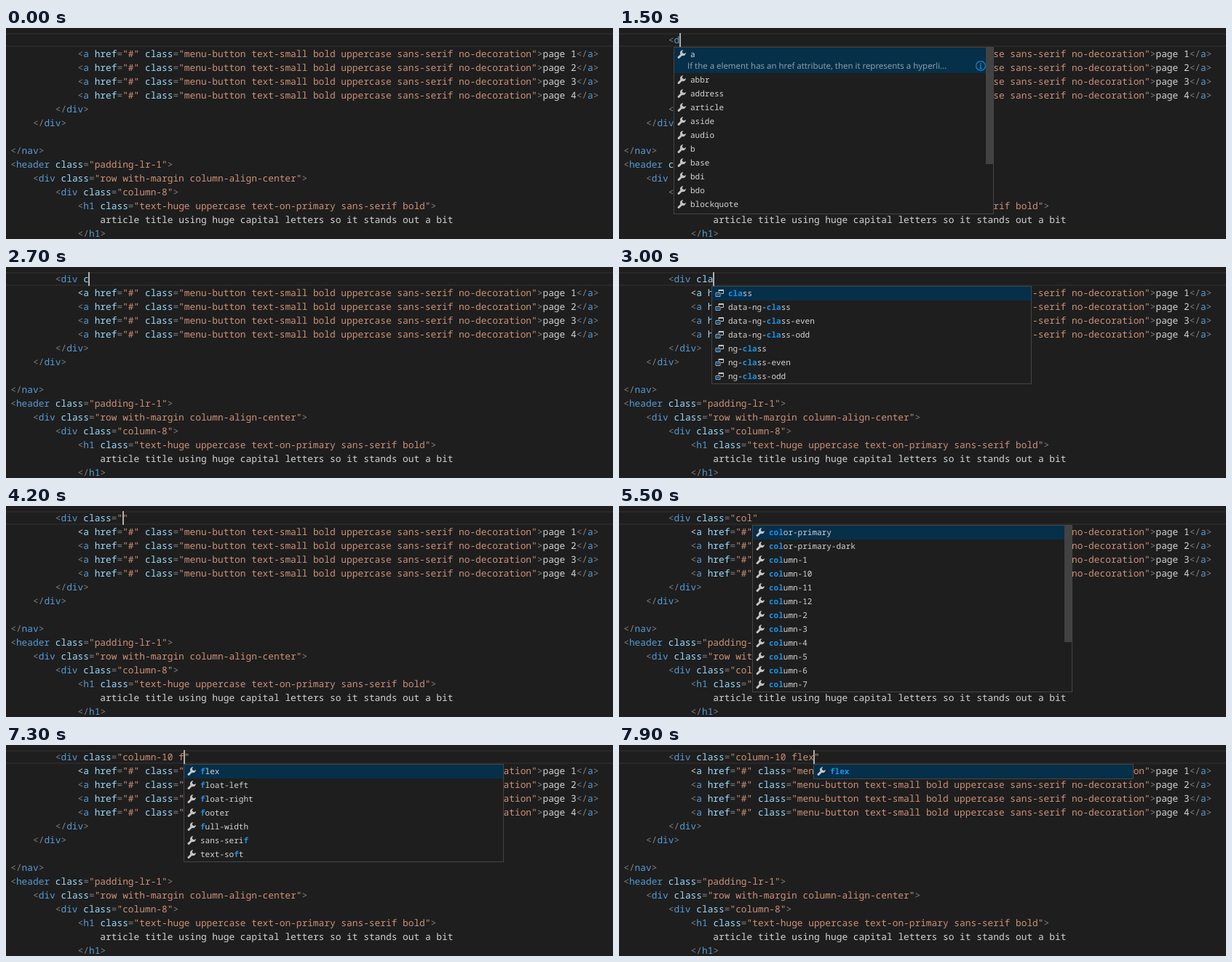
Recreate the animation shown at these times as an HTML page. Size 834 px wide and 290 px high, loop 8 s.

```html
<!DOCTYPE html>
<html lang="en">
<head>
<meta charset="utf-8">
<title>Code completion</title>
<style>
html, body { margin: 0; width: 100%; height: 100%; overflow: hidden; background: #1e1e1e; }
#stage {
  position: relative; width: 834px; height: 290px; overflow: hidden;
  font: 12.83px/19px "Noto Sans Mono", monospace; text-rendering: geometricPrecision;
  font-variant-ligatures: none; color: #d4d4d4;
}
#active { position: absolute; left: -2px; right: -2px; top: 7px; height: 15px; border: 2px solid #282828; }
#code { position: absolute; left: 6.2px; top: 7px; }
#code div { height: 19px; white-space: pre; }
.mark { color: #808080; }
.tag { color: #569cd6; }
.attr { color: #9cdcfe; }
.str { color: #ce9178; }
#caret { position: absolute; top: 7px; width: 2px; height: 19px; background: #aeafad; }
#popup {
  position: absolute; top: 26px; width: 440px; max-height: 230px; box-sizing: border-box;
  border: 1px solid #454545; background: #1e1e1e; overflow: hidden; font-size: 11px;
}
.item { position: relative; height: 19px; padding-left: 22px; white-space: pre; }
.item.selected { background: #062f4a; }
.item.detailed { height: 35px; }
.item b { color: #1a94e6; }
.item svg { position: absolute; left: 3px; top: 2px; width: 14px; height: 14px; }
.doc {
  position: absolute; left: 18px; top: 17px; width: 396px; height: 17px; overflow: hidden;
  font: 11.5px/17px "Open Sans", sans-serif; color: #93a5b1;
}
.item .info { left: 413px; top: 17px; width: 16px; height: 16px; }
.thumb { position: absolute; right: 0; top: 0; width: 10px; height: 160px; background: #424242; }
</style>
</head>
<body>
<svg width="0" height="0" style="position:absolute">
  <symbol id="wrench" viewBox="0 0 14 14">
    <path d="M3 11.5 8 6.5" stroke="#c5c5c5" stroke-width="3" stroke-linecap="round"/>
    <path d="M9.2 1.2A4 4 0 1 0 12.9 5L10.6 6.3 8 6 7.8 3.4Z" fill="#c5c5c5"/>
  </symbol>
  <symbol id="field" viewBox="0 0 14 14">
    <path d="M6 5.5V2.5H12.5V7.5H9" fill="none" stroke="#c5c5c5"/>
    <path d="M6 3H12.5" stroke="#c5c5c5" stroke-width="2"/>
    <path d="M2 6.5H8V11.5H2Z" fill="#1e1e1e" stroke="#75beff"/>
    <path d="M3.5 9H6.5" stroke="#75beff"/>
  </symbol>
  <symbol id="info" viewBox="0 0 16 16">
    <circle cx="8" cy="8" r="6.4" fill="none" stroke="#1a83c8" stroke-width="1.2"/>
    <path d="M8 4V5.6M6.5 7.2H8V11.5M6.3 11.5H9.7" fill="none" stroke="#1a83c8" stroke-width="1.3"/>
  </symbol>
</svg>
<div id="stage">
  <div id="active"></div>
  <div id="code"></div>
  <div id="caret"></div>
  <div id="popup"></div>
</div>
<script>
const LOOP = 8000, CHAR = 7.697, LEFT = 6.2, INDENT = 8;
const $ = id => document.getElementById(id);
const pad = n => ' '.repeat(n);
const escapeHtml = s => s.replace(/&/g, '&amp;').replace(/</g, '&lt;');
const columnX = col => Math.floor(LEFT + (INDENT + col) * CHAR);
const icon = (id, cls = '') => `<svg class="${cls}"><use href="#${id}"/></svg>`;

const link = n => pad(12) +
  `<a href="#" class="menu-button text-small bold uppercase sans-serif no-decoration">page ${n}</a>`;
const page = [
  link(1), link(2), link(3), link(4),
  pad(8) + '</div>', pad(4) + '</div>', '', '</nav>',
  '<header class="padding-lr-1">',
  pad(4) + '<div class="row with-margin column-align-center">',
  pad(8) + '<div class="column-8">',
  pad(12) + '<h1 class="text-huge uppercase text-on-primary sans-serif bold">',
  pad(16) + 'article title using huge capital letters so it stands out a bit',
  pad(12) + '</h1>'
];

// An unclosed tag on the line above turns the next tag's name into an attribute.
function highlight(line, inTag = false) {
  let named = inTag;
  return line.replace(/<\/?|>|"[^"]*"?|=|\s+|[^\s<>="]+/g, token => {
    let kind = '';
    if (token[0] === '<') {
      kind = inTag ? '' : 'mark';
      named = inTag;
      inTag = true;
    } else if (token === '>') {
      kind = 'mark';
      inTag = false;
    } else if (inTag && token.trim()) {
      if (token === '=') kind = 'mark';
      else if (token[0] === '"') kind = 'str';
      else { kind = named ? 'attr' : 'tag'; named = true; }
    }
    return `<span class="${kind}">${escapeHtml(token)}</span>`;
  });
}

const words = s => s.split(' ');
const menu = (list, iconId, doc) => ({ items: words(list), iconId, doc });
const menus = {
  tags: menu('a abbr address article aside audio b base bdi bdo blockquote body', 'wrench',
    'If the a element has an href attribute, then it represents a hyperli...'),
  d: menu('div data datalist dd del details dfn dialog dl dt', 'wrench',
    'The div element has no special meaning at all. It represents its children. I...'),
  attrs: menu('class contenteditable contextmenu accesskey data-ng-change data-ng-checked ' +
    'data-ng-class data-ng-class-even data-ng-class-odd data-ng-click data-ng-cloak data-ng-copy', 'field'),
  cl: menu('class data-ng-class data-ng-class-even data-ng-class-odd data-ng-click data-ng-cloak ' +
    'data-ng-dblclick data-ng-include ng-class ng-class-even ng-class-odd ng-click', 'field'),
  cla: menu('class data-ng-class data-ng-class-even data-ng-class-odd ng-class ng-class-even ng-class-odd', 'field'),
  columns: menu('color-primary color-primary-dark column-1 column-10 column-11 column-12 ' +
    'column-2 column-3 column-4 column-5 column-6 column-7', 'wrench'),
  f: menu('flex float-left float-right footer full-width sans-serif text-soft', 'wrench'),
  flex: menu('flex', 'wrench')
};
menus.di = { ...menus.d, items: words('div dialog audio bdi dir') };
menus.div = { ...menus.d, items: ['div'] };

const popup = (name, col, query, selected = 0) => ({ ...menus[name], col, query, selected });
const ON = true, OFF = false;
const cls = '<div class="', ten = cls + 'column-10';

// [start ms, typed text, caret, popup]
const steps = [
  [0, '', OFF], [300, '', ON], [600, '', OFF], [1000, '', ON],
  [1200, '<', ON], [1300, '<', ON, popup('tags', 1, '')],
  [1500, '<d', ON, popup('tags', 1, '')],
  [1600, '<d', ON, popup('d', 2, 'd')],
  [1700, '<di', ON, popup('di', 3, 'di')],
  [1900, '<div', ON, popup('div', 4, 'div')],
  [2000, '<div ', ON], [2400, '<div ', OFF],
  [2700, '<div c', ON], [2800, '<div c', ON, popup('attrs', 6, 'c')],
  [2900, '<div cl', ON, popup('cl', 7, 'cl')],
  [3000, '<div cla', ON, popup('cla', 7.75, 'cla')],
  [3100, '<div cla', ON, popup('cla', 8, 'cla')],
  [3400, cls, ON], [3800, cls, OFF], [4200, cls, ON], [4500, cls, OFF],
  [4700, cls + 'c', ON], [4800, cls + 'c', ON, popup('columns', 13, 'c')],
  [4900, cls + 'co', ON, popup('columns', 14, 'co')],
  [5000, cls + 'col', ON, popup('columns', 14.75, 'col')],
  [5100, cls + 'col', ON, popup('columns', 15, 'col')],
  [5500, cls + 'col', OFF, popup('columns', 15, 'col')],
  [5600, cls + 'col', OFF, popup('columns', 15, 'col', 1)],
  [5700, cls + 'col', OFF, popup('columns', 15, 'col', 2)],
  [5800, cls + 'col', ON, popup('columns', 15, 'col', 3)],
  [6100, ten, ON], [6400, ten, OFF],
  [6600, ten + ' ', ON], [7000, ten + ' ', OFF],
  [7200, ten + ' f', ON], [7300, ten + ' f', ON, popup('f', 23, 'f')],
  [7400, ten + ' fl', ON, popup('flex', 24, 'fl')],
  [7500, ten + ' fle', ON, popup('flex', 25, 'fle')],
  [7800, ten + ' flex', ON, popup('flex', 25.75, 'flex')],
  [7900, ten + ' flex', ON, popup('flex', 26, 'flex')]
];

function itemHtml(menu, label, i) {
  const selected = i === menu.selected, detailed = selected && menu.doc;
  const text = menu.query ? label.replace(menu.query, '<b>$&</b>') : label;
  const doc = detailed ? `<div class="doc">${menu.doc}</div>${icon('info', 'info')}` : '';
  return `<div class="item ${selected ? 'selected' : ''} ${detailed ? 'detailed' : ''}">` +
    icon(menu.iconId) + text + doc + '</div>';
}

$('code').innerHTML = ['', ...page].map(line => `<div>${highlight(line)}</div>`).join('');
const [typedRow, nextRow] = $('code').children;

function show([, text, caret, menu]) {
  const closing = text.includes('"') ? '"' : '';
  typedRow.innerHTML = text && highlight(pad(INDENT) + text + closing);
  nextRow.innerHTML = highlight(page[0], text.length > 1);
  $('caret').style.left = columnX(text.length) + 'px';
  $('caret').hidden = !caret;
  $('popup').hidden = !menu;
  if (!menu) return;
  $('popup').style.left = columnX(menu.col) + 'px';
  $('popup').innerHTML = menu.items.map((label, i) => itemHtml(menu, label, i)).join('') +
    (menu.items.length > 9 ? '<div class="thumb"></div>' : '');
}

let current;
function tick() {
  const t = performance.now() % LOOP;
  const step = steps.findLast(s => s[0] <= t);
  if (step !== current) show(current = step);
  requestAnimationFrame(tick);
}
tick();
</script>
</body>
</html>
```
